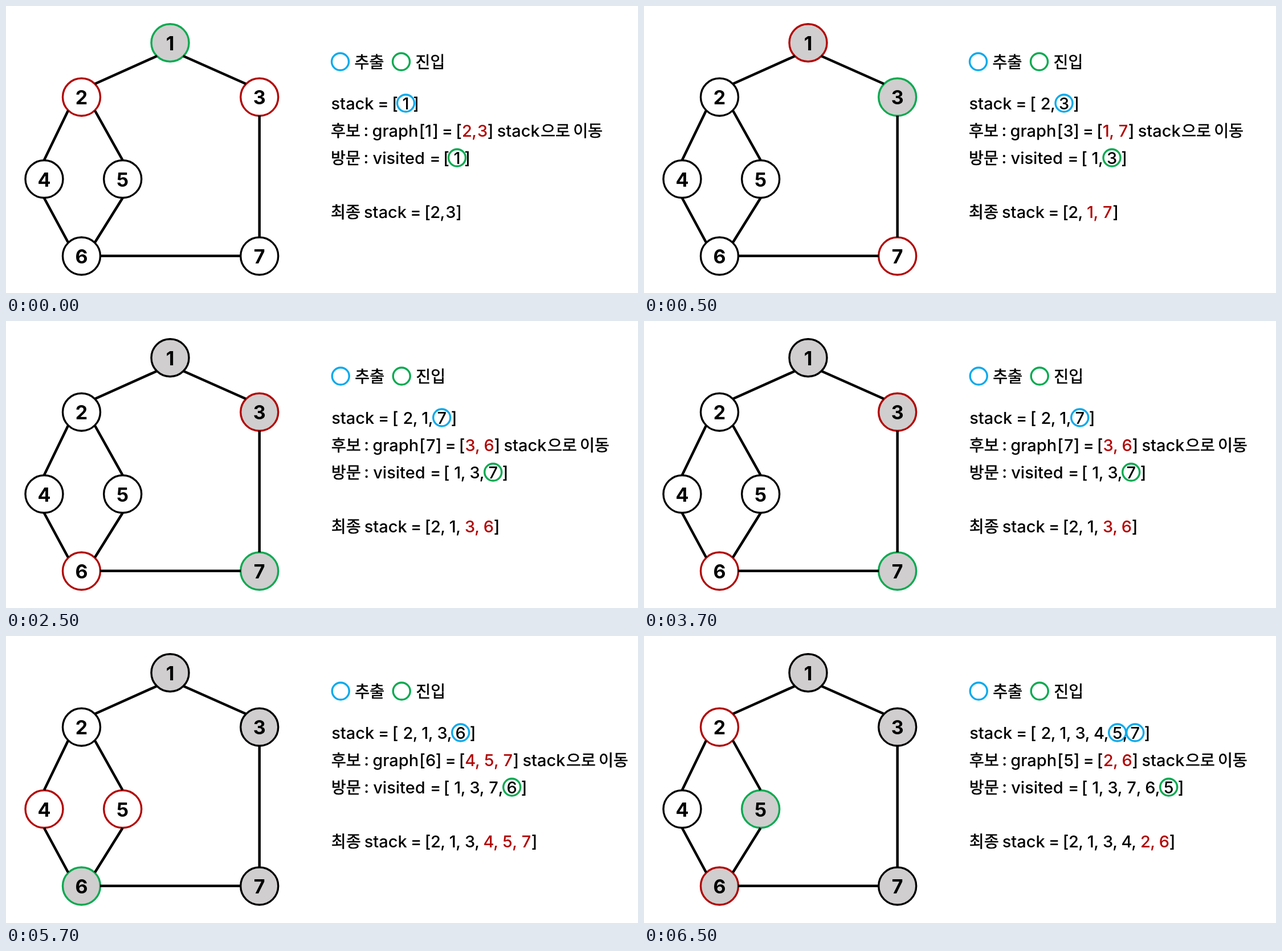
These frames come from a looping animation (1109 by 505 pixels, 8000 ms). An HTML page:

```html
<!DOCTYPE html>
<html lang="ko">
<head>
<meta charset="utf-8">
<style>
  html, body { margin: 0; width: 100%; height: 100%; overflow: hidden; background: #fff; }
  svg { display: block; width: 1109px; height: 505px; }
  text { font: 500 29px Inter, Roboto, sans-serif; fill: currentColor; }
  .ko { font-family: "Noto Sans CJK KR", "Noto Sans CJK", sans-serif; font-size: 28.2px; stroke: currentColor; stroke-width: .6px; }
  .num { font-size: 34px; font-weight: 700; }
  .mid { text-anchor: middle; }
  circle { fill: none; stroke-width: 3.4px; }
  line { stroke: #000; stroke-width: 4.5px; }
</style>
</head>
<body>
<svg id="stage" viewBox="0 0 1109 505"></svg>
<script>
const BLACK = '#000', RED = '#b30404', GREEN = '#08aa50', BLUE = '#0aaaec', GRAY = '#d0cece';
const LOOP = 8000;
const stage = document.getElementById('stage');

const nodes = { 1: [288, 64.7], 2: [132.5, 160.3], 3: [444.7, 160.3], 4: [67, 304.5], 5: [204.7, 304.5], 6: [132.5, 440], 7: [444.7, 440] };
const edges = [
  [265, 88, 156, 137], [311, 88, 421, 137], [109, 184, 67, 271], [156, 184, 204.5, 271],
  [67, 338, 109, 416], [204.5, 338, 156, 416], [444.7, 193, 444.7, 407], [165, 439.7, 412, 439.7]
];

// red: highlighted nodes; rings: circled items ending the stack; fresh: red items ending the result
const steps = [
  { at: 0, now: 1, seen: [1], next: [2, 3], red: [2, 3], stack: [1], rings: 1, result: [2, 3], fresh: 0, gap: 10 },
  { at: 500, now: 3, seen: [1, 3], next: [1, 7], red: [1, 7], stack: [2, 3], rings: 1, result: [2, 1, 7], fresh: 2 },
  { at: 2500, now: 7, seen: [1, 3, 7], next: [3, 6], red: [3, 6], stack: [2, 1, 7], rings: 1, result: [2, 1, 3, 6], fresh: 2, move: '.7 -1' },
  { at: 4500, now: 6, seen: [1, 3, 7, 6], next: [4, 5, 7], red: [4, 5], stack: [2, 1, 3, 6], rings: 1, result: [2, 1, 3, 4, 5, 7], fresh: 3, move: '.7 -1' },
  { at: 6500, now: 5, seen: [1, 3, 7, 6, 5], next: [2, 6], red: [2, 6], stack: [2, 1, 3, 4, 5, 7], rings: 2, result: [2, 1, 3, 4, 2, 6], fresh: 2, move: '.7 -1' }
];

function add(parent, tag, attrs, content) {
  const el = document.createElementNS('http://www.w3.org/2000/svg', tag);
  for (const key in attrs) el.setAttribute(key, attrs[key]);
  if (content !== undefined) el.textContent = content;
  parent.appendChild(el);
  return el;
}
const word = (g, x, y, s, cls = '') => add(g, 'text', { x, y, class: cls }, s);
const glyph = (g, x, y, s, color = BLACK) => add(g, 'text', { x, y, class: 'mid', color }, s);
const ring = (g, cx, cy, stroke) => add(g, 'circle', { cx, cy, r: 15, stroke });

// Lays out digits and the closing bracket; returns the bracket's centre.
function list(g, x, y, items, { reds = 0, rings = 0, color, gap = 16 } = {}) {
  const last = items.length - 1;
  items.forEach((n, i) => {
    const width = n === 1 ? 11 : 17;
    const tint = i > last - reds ? RED : BLACK;
    const ringed = i > last - rings;
    const cx = x + (n === 1 ? 5 : ringed ? 7.5 : 8.3);
    glyph(g, cx, y, n, tint);
    if (ringed) ring(g, cx, y - 11, color);
    if (i < last) {
      glyph(g, x + width + 4, y, ',', tint);
      x += width + (ringed ? 14 : gap);
    } else {
      x += ringed ? (n === 1 ? 23 : 29) : 22.5;
    }
  });
  glyph(g, x, y, ']');
  return x;
}

function drawGraph(g, s) {
  for (const n in nodes) {
    const id = +n, [cx, cy] = nodes[n];
    const stroke = id === s.now ? GREEN : s.red.includes(id) ? RED : BLACK;
    add(g, 'circle', { cx, cy, r: 33, stroke, style: `fill:${s.seen.includes(id) ? GRAY : '#fff'}` });
    add(g, 'text', { x: cx, y: cy + 13, class: 'num mid' }, n);
  }
  for (const [x1, y1, x2, y2] of edges) add(g, 'line', { x1, y1, x2, y2 });
}

function drawNotes(g, s) {
  ring(g, 586.5, 98, BLUE);
  word(g, 611.5, 109, '추출', 'ko');
  ring(g, 693.5, 98, GREEN);
  word(g, 718.5, 109, '진입', 'ko');

  word(g, 570.5, 182, 'stack');
  glyph(g, 662, 182, '=');
  glyph(g, 682.5, 182, '[');
  list(g, 696.5, 182, s.stack, { rings: s.rings, color: BLUE });

  const wide = s.now === 1 ? 0 : 5;
  word(g, 570, 230, '후보', 'ko');
  glyph(g, 632, 229, ':');
  word(g, 642.5, 230, 'graph');
  glyph(g, 730, 230, '[');
  glyph(g, 741 + wide * .7, 230, s.now);
  glyph(g, 753.5 + wide, 230, ']');
  glyph(g, 774.5 + wide, 230, '=');
  glyph(g, 794.5 + wide, 230, '[');
  const end = list(g, 800.7 + wide, 230, s.next, { reds: s.next.length, gap: s.gap });
  word(g, end + 11.5, 230, 'stack');
  word(g, end + 88, 230, '으로', 'ko');
  word(g, end + 145, 230, '이동', 'ko');

  word(g, 570, 278, '방문', 'ko');
  glyph(g, 632, 277, ':');
  word(g, 643.5, 278, 'visited');
  glyph(g, 753, 278, '=');
  glyph(g, 772.5, 278, '[');
  list(g, 786.5, 278, s.seen, { rings: 1, color: GREEN });

  word(g, 570, 373, '최종', 'ko');
  word(g, 628, 373, 'stack');
  glyph(g, 719, 373, '=');
  glyph(g, 739.5, 373, '[');
  list(g, 745, 373, s.result, { reds: s.fresh, gap: s.gap });
}

const scenes = steps.map(s => {
  const g = add(stage, 'g', { color: BLACK });
  drawGraph(g, s);
  drawNotes(add(g, 'g', { transform: `translate(${s.move || '0 0'})` }), s);
  return g;
});

const start = performance.now();
function tick() {
  const t = (performance.now() - start) % LOOP;
  const current = steps.findLastIndex(s => t >= s.at);
  scenes.forEach((g, i) => { g.style.display = i === current ? '' : 'none'; });
  requestAnimationFrame(tick);
}
tick();
</script>
</body>
</html>
```
